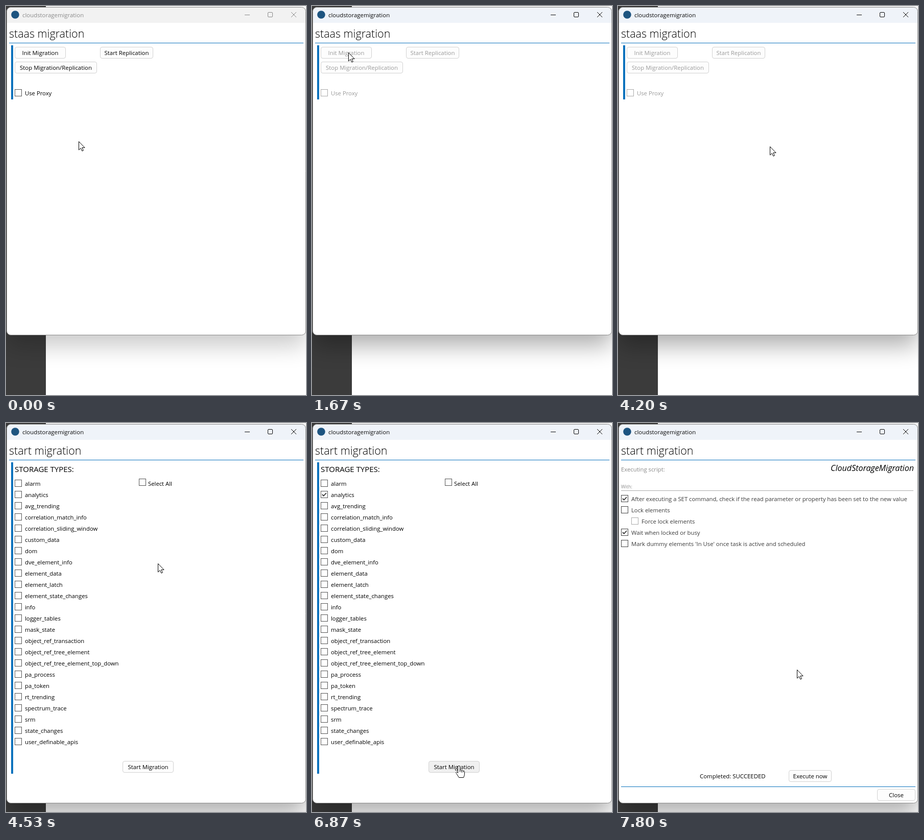
Write an HTML page with a canvas that moves like this. It is 587 px wide and 762 px high and loops after 9.47 s.

```html
<!DOCTYPE html>
<html lang="en">
<head>
<meta charset="utf-8">
<title>cloudstoragemigration</title>
<style>
html, body { margin: 0; width: 100%; height: 100%; overflow: hidden; background: #fff }
canvas { display: block }
</style>
</head>
<body>
<canvas id="stage" width="587" height="762"></canvas>
<script>
const c = document.getElementById('stage').getContext('2d');
const LOOP = 9470, TICK = 1000 / 15;
const BLUE = '#0a72bd', SANS = '"Open Sans", "Noto Sans", sans-serif';
const types = `alarm analytics avg_trending correlation_match_info correlation_sliding_window
  custom_data dom dve_element_info element_data element_latch element_state_changes info
  logger_tables mask_state object_ref_transaction object_ref_tree_element
  object_ref_tree_element_top_down pa_process pa_token rt_trending spectrum_trace srm
  state_changes user_definable_apis`.split(/\s+/);

// first tick, last tick, then cubic Bezier points
const moves = [
  [2, 9, 142, 265, 220, 240, -70, 70, 71, 91],
  [49, 54, 71, 91, 140, 157, 208, 222, 277, 288],
  [59, 63, 277, 288, 284, 284, 290, 279, 297, 275],
  [75, 84, 297, 275, 216, 230, 136, 184, 55, 139],
  [93, 103, 55, 139, 300, 250, 430, 650, 287, 671],
  [110, 117, 287, 671, 307, 608, 330, 546, 350, 483]
];
const arrow = new Path2D('M0 0V16.5L3.8 13L6.4 18.6L8.9 17.5L6.4 12H11.6Z');
const hand = new Path2D('M-2 2Q-2 0 0 0Q2 0 2 2V8Q4 7 5 9Q7 8 8 10Q11 9 11 12V16Q11 19 9 23H0Q-3 18 -5 15Q-7 12 -4 12L-2 14ZM2 8V12M5 9V13M8 10V13');

const clamp = v => Math.max(0, Math.min(1, v));
const mix = (a, b, u) => `rgb(${a.map((v, i) => v + (b[i] - v) * u)})`;
const inside = (p, x, y, w, h) => p.x >= x && p.x < x + w && p.y >= y && p.y < y + h;

function cursorAt(k) {
  const [a, b, x0, y0, x1, y1, x2, y2, x3, y3] = moves.findLast(m => k >= m[0]) || moves[0];
  const s = clamp((k - a + 1) / (b - a + 1)), u = s * s * (3 - 2 * s), v = 1 - u;
  const at = (p, q, r, t) => v * v * v * p + 3 * v * v * u * q + 3 * v * u * u * r + u * u * u * t;
  return { x: Math.round(at(x0, x1, x2, x3)), y: Math.round(at(y0, y1, y2, y3)) };
}

function rect(x, y, w, h, color) {
  c.fillStyle = color;
  c.fillRect(x, y, w, h);
}

function text(str, x, y, size = 11.3, color = '#000', align = 'left', style = '') {
  c.font = `${style} ${size}px ${SANS}`;
  c.fillStyle = color;
  c.textAlign = align;
  c.fillText(str, x, y);
}

function button(label, x, y, w, color = '#000', fill = '#fdfdfd') {
  c.beginPath();
  c.roundRect(x + .5, y + .5, w - 1, 22, 3.5);
  c.fillStyle = fill;
  c.fill();
  c.strokeStyle = '#d2d2d2';
  c.lineWidth = 1;
  c.stroke();
  text(label, x + w / 2, y + 16, 11.4, color, 'center');
}

function checkbox(x, y, color = '#555', tick = 0) {
  c.strokeStyle = color;
  c.lineWidth = 1;
  c.strokeRect(x + .5, y + .5, 13, 13);
  if (!tick) return;
  c.save();
  c.beginPath();
  c.rect(x, y, 14 * tick, 14);
  c.clip();
  c.beginPath();
  c.moveTo(x + 3, y + 7);
  c.lineTo(x + 5.8, y + 9.8);
  c.lineTo(x + 11, y + 4);
  c.strokeStyle = '#333';
  c.lineWidth = 1.8;
  c.stroke();
  c.restore();
}

function windowFrame(bottom, active, title) {
  rect(0, 0, 587, 762, '#fff');
  rect(0, 0, 78, 762, '#3b3b3b');
  c.save();
  c.shadowColor = `rgba(0,0,0,${.22 + .11 * active})`;
  c.shadowBlur = 46;
  c.shadowOffsetY = 20;
  c.beginPath();
  c.roundRect(1.5, 2.5, 585, bottom - 2, 8);
  c.fillStyle = '#fff';
  c.fill();
  c.restore();
  c.save();
  c.clip();
  rect(1, 2, 586, 31, mix([242, 242, 242], [239, 243, 249], active));
  c.restore();
  c.strokeStyle = '#8a8a8a';
  c.lineWidth = 1;
  c.stroke();

  c.beginPath();
  c.arc(18, 17, 7.8, 0, 7);
  c.fillStyle = '#1d5480';
  c.fill();
  const ink = mix([138, 138, 138], [10, 10, 10], active);
  text('cloudstoragemigration', 32, 22, 11.4, ink);
  c.strokeStyle = ink;
  c.beginPath();
  c.moveTo(467, 17.5);
  c.lineTo(477, 17.5);
  c.roundRect(512.5, 12.5, 9, 9, 1.5);
  c.moveTo(558, 12);
  c.lineTo(568, 22);
  c.moveTo(568, 12);
  c.lineTo(558, 22);
  c.stroke();

  text(title, 6, 62, 21.5, '#000', 'left', '300');
  rect(6, 72, 576, 1, BLUE);
}

function startScreen(k) {
  const off = k >= 21;
  windowFrame(644, clamp((k - 20) / 5), 'staas migration');
  rect(10, 77, 4, 106, BLUE);
  const ink = off ? '#9a9a9a' : '#000';
  button('Init Migration', 17, 80, 100, ink);
  button('Start Replication', 184, 80, 104, ink);
  button('Stop Migration/Replication', 17, 109, 161, ink);
  checkbox(17, 163, off ? '#aaa' : '#555');
  text('Use Proxy', 37, 175, 11.3, ink);
}

function typesScreen(k, p) {
  windowFrame(744, 1, 'start migration');
  rect(10, 77, 4, 610, BLUE);
  text('STORAGE TYPES:', 17, 96, 15);
  types.forEach((name, i) => {
    const y = 111 + 22 * i;
    const hover = i === 1 && inside(p, 17, y, 67, 14);
    checkbox(17, y, hover ? '#000' : '#555', i === 1 ? clamp((k - 86) / 4) : 0);
    text(name, 37, y + 12);
  });
  checkbox(260, 109);
  text('Select All', 278, 123);
  const hover = inside(p, 228, 662, 100, 23);
  button('Start Migration', 228, 662, 100, '#000', hover ? '#f0f0f0' : '#fdfdfd');
}

function scriptScreen() {
  windowFrame(744, 1, 'start migration');
  text('Executing script:', 6, 95, 11.3, '#8a8a8a');
  text('CloudStorageMigration', 579, 94, 16.1, '#000', 'right', 'italic');
  text('With:', 6, 128, 9.1, '#8a8a8a');
  rect(6, 132, 572, 1, '#aaa');
  [
    ['After executing a SET command, check if the read parameter or property has been set to the new value', 6, 1],
    ['Lock elements', 6, 0],
    ['Force lock elements', 26, 0],
    ['Wait when locked or busy', 6, 1],
    ["Mark dummy elements 'In Use' once task is active and scheduled", 6, 0]
  ].forEach(([label, x, on], i) => {
    const y = 141 + 22 * i;
    checkbox(x, y, x > 6 ? '#aaa' : '#444', on);
    text(label, x + 20, y + 12, 11.3, '#3c3c3c');
  });
  text('Completed: SUCCEEDED', 160, 696, 11.4);
  button('Execute now', 334, 680, 84);
  rect(6, 712, 576, 1, BLUE);
  button('Close', 507, 717, 75);
}

function drawCursor(k, p) {
  const overButton = k < 12 ? inside(p, 17, 80, 100, 23) || inside(p, 17, 109, 161, 23)
    : k >= 68 && k < 110 && inside(p, 228, 662, 100, 23);
  const shape = overButton ? hand : arrow;
  c.save();
  c.translate(p.x + .5, p.y + .5);
  c.fillStyle = '#fff';
  c.strokeStyle = '#000';
  c.lineWidth = 1;
  c.fill(shape);
  c.stroke(shape);
  c.restore();
}

function draw(now) {
  const k = Math.floor((now % LOOP + 4) / TICK), p = cursorAt(k);
  if (k < 68) startScreen(k);
  else if (k < 110) typesScreen(k, p);
  else scriptScreen();
  drawCursor(k, p);
}

const begin = performance.now();
function loop() {
  draw(performance.now() - begin);
  requestAnimationFrame(loop);
}
loop();
</script>
</body>
</html>
```
